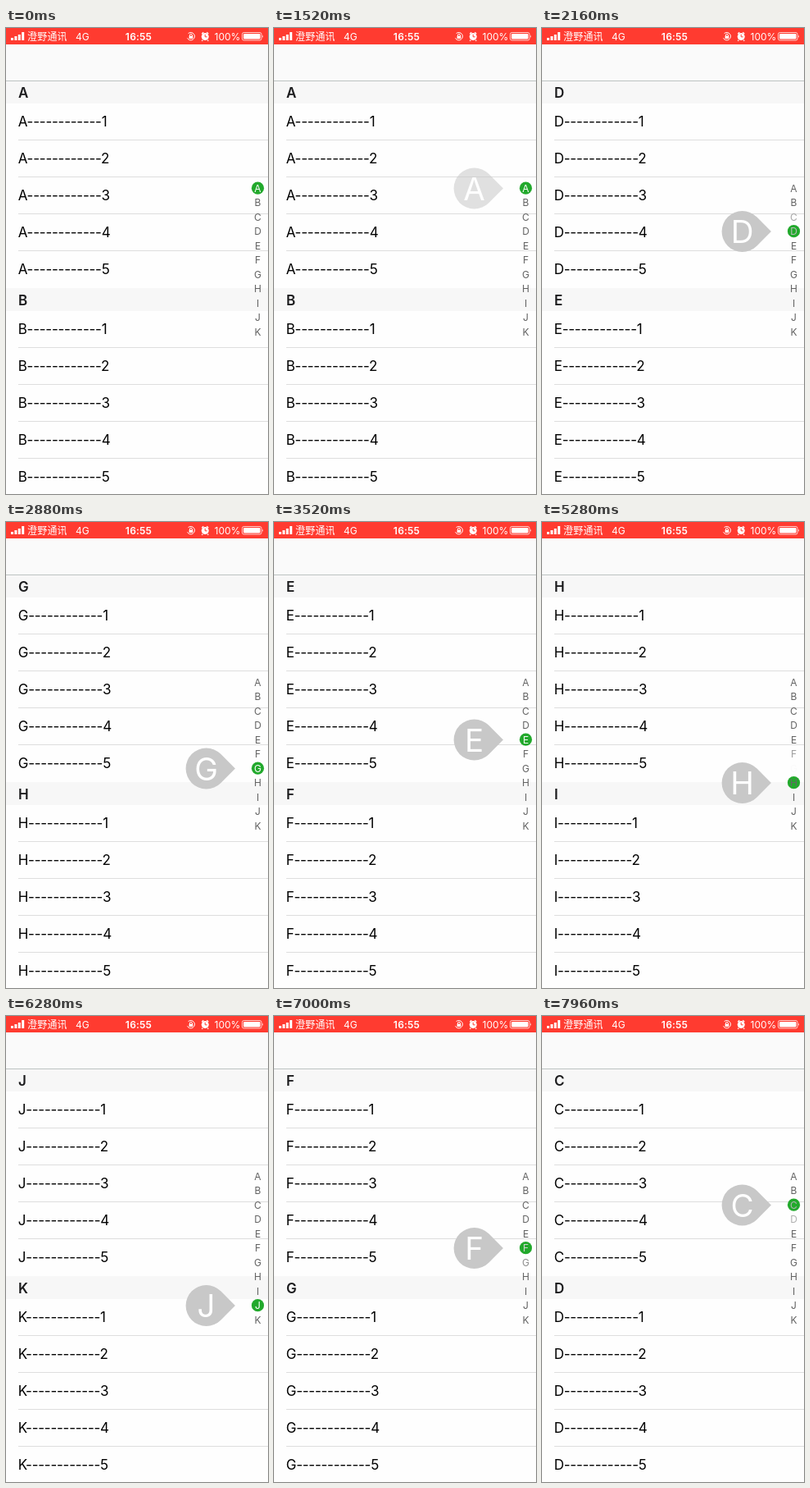
An HTML page for the animation above (8 s loop, 320 px wide and 568 px high).

```html
<!DOCTYPE html>
<html lang="zh">
<head>
<meta charset="utf-8">
<title>Section index</title>
<style>
  html, body { margin: 0; width: 100%; height: 100%; overflow: hidden; background: #fefefe; }
  svg { display: block; width: 320px; height: 568px; font-family: Inter, "Liberation Sans", sans-serif; }
  text { font-feature-settings: "calt" 0; font-variant-ligatures: none; }
  .row { font-size: 17px; letter-spacing: -.23px; fill: #000; }
  .head { font-size: 17px; font-weight: 600; fill: #1c1c1e; }
  .index { font-size: 12px; text-anchor: middle; }
  .status { font-size: 12px; fill: #fff; }
  .cjk { font-family: "Noto Sans CJK SC", "Noto Sans CJK", sans-serif; letter-spacing: .2px; }
  .time { font-weight: 600; text-anchor: middle; letter-spacing: .2px; }
  .big { font-size: 38.5px; text-anchor: middle; fill: #fff; }
</style>
</head>
<body>
<svg id="stage" viewBox="0 0 320 568">
  <rect width="320" height="568" fill="#fefefe"/>
  <rect y="20" width="320" height="44" fill="#fafafa"/>
  <rect y="64" width="320" height="1" fill="#bcc3c2"/>
  <g id="status">
    <rect width="320" height="20" fill="#ff3b30"/>
    <path d="M6 12h3v3h-3zM10.4 10h3v5h-3zM14.8 8h3v7h-3zM19.2 5h3v10h-3z" fill="#fff"/>
    <text class="status cjk" x="26" y="14.6">澄野通讯</text>
    <text class="status" x="85" y="14.6">4G</text>
    <text class="status time" x="162" y="14.5">16:55</text>
    <g fill="none" stroke="#fff">
      <path d="M222.6 6.6A4.7 4.7 0 1 1 221.5 12.3"/>
      <path d="M224.4 10v-1.2a1.5 1.5 0 0 1 3 0v1.2"/>
      <path d="M239.2 7.3l2-2M247.2 7.3l-2-2M240.2 14.8l-1 1M246.2 14.8l1 1" stroke-width="1.4"/>
    </g>
    <rect x="223.6" y="9.6" width="4.6" height="3.4" fill="#fff"/>
    <circle cx="243.2" cy="10.6" r="4.5" fill="#fff"/>
    <path d="M243.2 7.8v3h2.4" fill="none" stroke="#ff3b30"/>
    <text class="status" x="254.5" y="14.5">100%</text>
    <rect x="288.5" y="5.5" width="23.5" height="9.5" rx="2" fill="none" stroke="#fff" stroke-opacity=".75"/>
    <rect x="290" y="7" width="20.5" height="6.5" rx="1" fill="#fff"/>
    <path d="M313 8.5q1.8 1.7 0 3.4z" fill="#fff"/>
  </g>
</svg>
<script>
const LETTERS = [..."ABCDEFGHIJK"];
const LOOP = 8000, STEP = 40, FADE = 250, TOUCH = 1440;
const GREY = 98;

// [time, section] for every change of selection
const picks = [
  [0, "A"], [1620, "B"], [1860, "C"], [2077, "D"], [2300, "E"], [2480, "F"], [2630, "G"],
  [3090, "F"], [3320, "E"], [3560, "D"], [3800, "C"], [4285, "D"],
  [4780, "E"], [5000, "F"], [5190, "G"], [5268, "H"], [5460, "I"], [5740, "J"],
  [6340, "I"], [6540, "H"], [6710, "G"], [6892, "F"], [7180, "E"], [7540, "D"], [7885, "C"]
].map(([time, letter]) => ({ time, section: LETTERS.indexOf(letter) }));

// spans in which the picture stands still
const stalls = [[2880, 3040], [4160, 4320], [4320, 4600], [6000, 6280]];

const stage = document.getElementById("stage");
const indexY = i => 195.2 + 17.5 * i;

function add(tag, attrs, parent = stage, text = "") {
  const el = document.createElementNS("http://www.w3.org/2000/svg", tag);
  for (const key in attrs) el.setAttribute(key, attrs[key]);
  el.textContent = text;
  parent.append(el);
  return el;
}

function addSection(top) {
  add("rect", { y: top + (top === 64 ? 1 : 0), width: 320, height: top === 64 ? 27 : 28, fill: "#f7f7f7" });
  const head = add("text", { class: "head", x: 15, y: top + 20.8 });
  const rows = [];
  for (let i = 0; i < 5; i++) {
    const y = top + 28 + 45 * i;
    rows.push(add("text", { class: "row", x: 14.7, y: y + 28.3 }));
    if (i < 4) add("rect", { x: 15, y: y + 44, width: 305, height: 1, fill: "#dedede" });
  }
  return letter => {
    head.textContent = letter;
    rows.forEach((row, i) => row.textContent = letter + "-".repeat(12) + (i + 1));
  };
}

const sections = [addSection(64), addSection(317)];
const dot = add("circle", { cx: 307.5, r: 7.6, fill: "#22a92c" });
const labels = LETTERS.map((letter, i) =>
  add("text", { class: "index", x: 307.5, y: indexY(i) + 4.4 }, stage, letter));

const bubble = add("g", {});
const r = 25, k = r * Math.SQRT1_2;
add("path", { d: `M${k} ${-k}A${r} ${r} 0 1 0 ${k} ${k}L${r * Math.SQRT2} 0Z`, fill: "#c8c8c8" }, bubble);
const big = add("text", { class: "big", y: 14 }, bubble);

// cubic-bezier(.25, .1, .25, 1)
function ease(p) {
  if (p <= 0) return 0;
  if (p >= 1) return 1;
  let lo = 0, hi = 1, s = .5;
  for (let i = 0; i < 20; i++) {
    s = (lo + hi) / 2;
    if (.75 * s * (1 - s) + s ** 3 < p) lo = s; else hi = s;
  }
  return .3 * s * (1 - s) ** 2 + 3 * s * s * (1 - s) + s ** 3;
}

function whiteness(i, t) {
  let on = i === 0, since = -FADE;
  for (const { time, section } of picks) {
    if (time > t) break;
    if ((section === i) !== on) {
      on = !on;
      since = time;
    }
  }
  const p = ease((t - since) / FADE);
  return on ? p : 1 - p;
}

let shown = -1;

function draw(now) {
  let t = Math.floor(now % LOOP / STEP) * STEP;
  const stall = stalls.find(([from, to]) => t >= from && t < to);
  if (stall) t = stall[0];

  const { section } = picks.findLast(p => p.time <= t);
  if (section !== shown) {
    shown = section;
    sections.forEach((fill, i) => fill(LETTERS[section + i]));
    dot.setAttribute("cy", indexY(section));
    bubble.setAttribute("transform", `translate(244.6 ${indexY(section) + .3})`);
    big.textContent = LETTERS[section];
  }
  labels.forEach((label, i) => {
    const c = Math.round(GREY + (255 - GREY) * whiteness(i, t));
    label.setAttribute("fill", `rgb(${c},${c},${c})`);
  });
  bubble.setAttribute("opacity", ease((t - TOUCH) / FADE));
}

const start = performance.now();
function tick() {
  draw(performance.now() - start);
  requestAnimationFrame(tick);
}
tick();
</script>
</body>
</html>
```
